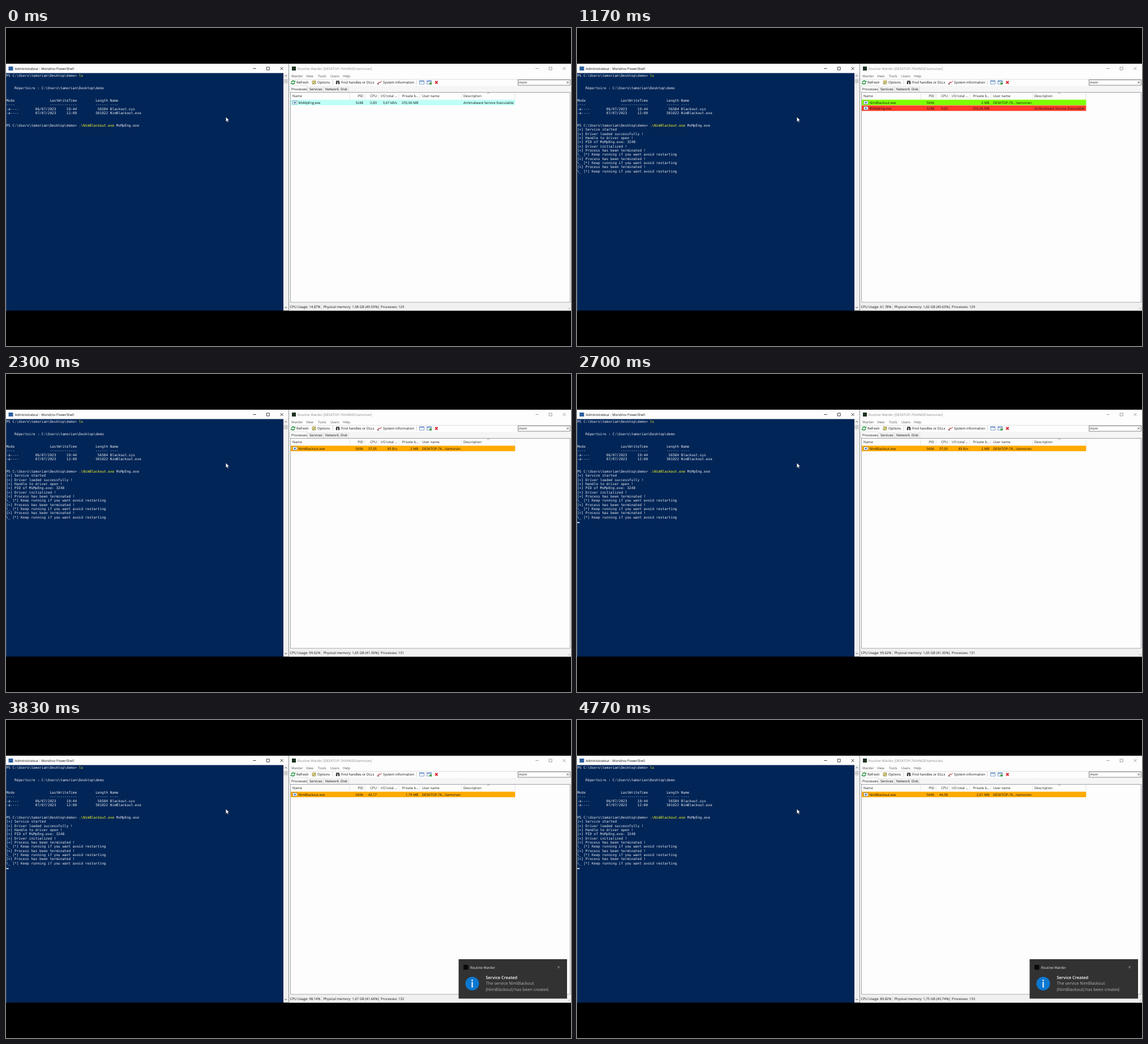
An HTML page for the animation above (4.81 s loop, 998x561 px).

```html
<!DOCTYPE html>
<html lang="fr">
<head>
<meta charset="utf-8">
<title>Process demo</title>
<style>
  html, body { margin: 0; width: 100%; height: 100%; overflow: hidden; background: #000; }
  svg { display: block; width: 998px; height: 561px; }
  text { font: 6px "Open Sans", "Noto Sans", sans-serif; white-space: pre; text-rendering: geometricPrecision; }
  .mono { font: 6.1px "DejaVu Sans Mono", monospace; fill: #eeedf0; }
  .cmd { fill: #ffff20; }
  .end { text-anchor: end; }
  .big { font-size: 7.45px; }
  .bold { font-weight: 600; }
</style>
</head>
<body>
<svg viewBox="0 0 998 561">
  <g id="frame"></g>
  <g id="list"></g>
  <g id="console"></g>
  <g id="toast"></g>
</svg>
<script>
const LOOP = 4810, ROW = 7.35, COL = 3.672, TOP = 63, BOTTOM = 498.5;
const USER = 'tamorian', APP = 'Routine Warder', WHITE = '#fdfdfd';
const PROMPT = `PS C:\\Users\\${USER}\\Desktop\\demo> `;
const layer = id => document.getElementById(id);

// y is the middle of the capitals
const text = (x, y, s, fill = '#111', cls = '') =>
  `<text x="${x}" y="${y + 2.1}" fill="${fill}" class="${cls}">${s}</text>`;
const rect = (x, y, w, h, fill, extra = '') =>
  `<rect x="${x}" y="${y}" width="${w}" height="${h}" fill="${fill}" ${extra}/>`;
const path = (d, stroke, width = 0.8, fill = 'none') =>
  `<path d="${d}" stroke="${stroke}" stroke-width="${width}" fill="${fill}"/>`;
const cross = (x, y, r, color, width) =>
  path(`M${x - r} ${y - r}l${2 * r} ${2 * r}m0 ${-2 * r}l${-2 * r} ${2 * r}`, color, width);
const mono = (row, s, col = 0, cls = '') =>
  text(0.4 + col * COL, 83.6 + row * ROW, s, '#eee', 'mono ' + cls);
const labels = (y, fill, items) => items.map(([x, s]) => text(x, y, s, fill)).join('');
const controls = (x, color) =>
  path(`M${x - 2.7} 71.5h5.4M${x + 21.2} 69h5v5h-5z`, color) + cross(x + 48, 71.5, 2.5, color);

function consoleWindow() {
  const listing = [
    [3, '    Répertoire : C:\\Users\\' + USER + '\\Desktop\\demo'],
    [6, 'Mode                 LastWriteTime         Length Name'],
    [7, '----                 -------------         ------ ----'],
    [8, '-a----        06/07/2023     19:44          56584 Blackout.sys'],
    [9, '-a----        07/07/2023     12:00         501022 NimBlackout.exe'],
    [12, PROMPT + '                  MsMpEng.exe'],
    [0, PROMPT]
  ];
  return rect(0, TOP, 499, 17, WHITE) + rect(0, 79.5, 490, BOTTOM - 79.5, '#022557') +
    rect(0, 79.5, 0.7, BOTTOM - 79.5, '#2f5f80') +
    rect(4.5, 68, 8, 7, '#2c5f9e') +
    text(15.5, 71.7, 'Administrateur : Mondrov PowerShell') + controls(439, '#111') +
    rect(490, 79.5, 9, BOTTOM - 79.5, '#f0f0f0') + rect(490.7, 90, 7, 7.5, '#cdcdcd') +
    path('M492.3 85.3l2-2 2 2M492.3 492l2 2 2-2', '#444', 0.9) +
    listing.map(([row, s]) => mono(row, s)).join('') +
    mono(0, 'ls', 35, 'cmd') + mono(12, '.\\NimBlackout.exe', 35, 'cmd') +
    path('M388.4 157v8.2l1.9-1.7 1.3 2.9 1.2-.6-1.3-2.8h2.5z', '#111', 0.3, '#fff');
}

function toolbar() {
  const pane = x => rect(x, 93, 8, 6, '#fff', 'stroke="#5b86c4" stroke-width=".8"') +
    rect(x, 93, 8, 1.5, '#5b86c4');
  return path('M504 95.5q3-4.5 6-.5M510 96.5q-3 4.5-6 .5', '#2f9a48', 1.8) +
    path('M508.3 95.2h3v-2.6zM505.6 96.8h-3v2.6z', 'none', 0, '#2f9a48') +
    rect(541, 93, 6, 6, '#e5d67a', 'stroke="#8c8240" stroke-width=".7" rx="1"') +
    path('M541.5 99l5-5', '#777', 1) +
    path('M584 99v-3l1-3M588 99v-3l-1-3', '#333', 2.4) +
    path('M655.5 98h2l1.5-3 1.5 2 3-3.5', '#b3202b', 1) + path('M656 99h3', '#222') +
    pane(730.5) + pane(743.5) + rect(748, 96, 4, 3.5, '#43a047') +
    cross(760.3, 96, 2.3, '#d8232f', 1.8) +
    path('M577 92v8M725 92v8', '#c8c8c8') +
    labels(96, '#111', [[513, 'Refresh'], [550, 'Options'], [592, 'Find handles or DLLs'],
      [666, 'System information']]);
}

function processWindow() {
  return rect(499, TOP, 499, BOTTOM - TOP, WHITE) + rect(499, TOP, 1, BOTTOM - TOP, '#8a9490') +
    rect(505, 68, 7, 7, '#1d3322') +
    text(515, 71.7, `${APP} [DESKTOP-7KX4M2E\\${USER}]`, '#8a8a8a') + controls(938, '#888') +
    labels(85, '#555', [[504, 'Warder'], [530, 'View'], [551, 'Tools'], [573, 'Users'], [595, 'Help']]) +
    path('M500 90.5h498', '#d8d8d8') + toolbar() +
    rect(904.5, 91.5, 92, 9.5, '#fff', 'stroke="#666" stroke-width=".8"') +
    text(906, 96.3, 'msm') + cross(992.3, 96, 1.8, '#333') +
    rect(500, 102, 498, 11.5, '#f5f5f5') + rect(532, 103, 73, 10, '#f0f0f0') +
    rect(502, 102, 30, 12, WHITE, 'stroke="#d5d5d5" stroke-width=".7"') +
    path('M561 103v10M588 103v10M605 103v10', '#d5d5d5') +
    labels(107.5, '#111', [[504, 'Processes'], [536, 'Services'], [564, 'Network'], [591, 'Disk']]) +
    rect(502.5, 113.5, 494, 370.5, WHITE, 'stroke="#858a90" stroke-width=".8"') +
    path([607, 634, 658, 694, 731, 805, 899].map(x => `M${x} 114.5v11`).join(''), '#dedede') +
    path('M850 116l2.3-2 2.3 2', '#777', 0.7) +
    labels(120, '#222', [[506, 'Name'], [662, 'I/O total ...'], [699.5, 'Private b...'],
      [735, 'User name'], [808, 'Description']]) +
    text(631, 120, 'PID', '#222', 'end') + text(655, 120, 'CPU', '#222', 'end') +
    rect(500, 485.5, 498, BOTTOM - 485.5, '#f0f0f0') +
    path('M557.5 487v10M659 487v10', '#d0d0d0') +
    path('M993 496.5l3.5-3.5M995 496.5l1.5-1.5', '#aaa');
}

function toastWindow() {
  return rect(799.5, 422, 191.5, 69.5, '#323232') +
    rect(808, 432, 8.5, 8.5, '#070b07') + text(820, 436.5, APP, '#f0f0f0') +
    cross(976, 436, 2, '#aaa', 0.7) +
    '<circle cx="823.5" cy="465" r="12" fill="#0b78d0"/>' +
    '<circle cx="823.5" cy="459.2" r="1.3" fill="#fff"/>' + rect(822.5, 462, 2, 10, '#fff') +
    text(847.5, 454.8, 'Service Created', '#fff', 'big bold') +
    text(847.5, 465.3, 'The service NimBlackout', '#b4b4b4', 'big') +
    text(847.5, 475.8, '(NimBlackout) has been created.', '#b4b4b4', 'big');
}

const engine = (color, cpu, io = '') =>
  [color, 'MsMpEng.exe', 3248, cpu, io, '255,06 MB', '', 'Antimalware Service Executable'];
const killer = (color, cpu, io, memory) =>
  [color, 'NimBlackout.exe', 5696, cpu, io, memory, `DESKTOP-7K...\\${USER}`, ''];
const CYAN = '#befff7', GREEN = '#7fff00', RED = '#ff3c28', ORANGE = '#ffaa00';

// cpu usage, physical memory, process count, rows
const snapshots = [
  ['14.87', '1,98 GB (49.59%)', 129, [engine(CYAN, '0,83', '3,47 kB/s')]],
  ['22.63', '1,99 GB (49.70%)', 129, [engine(CYAN, '0,02')]],
  ['61.78', '1,62 GB (40.63%)', 129, [killer(GREEN, '', '', '2 MB'), engine(RED, '0,02')]],
  ['99.62', '1,65 GB (41.30%)', 131, [killer(ORANGE, '37,05', '83 B/s', '2 MB')]],
  ['98.14', '1,67 GB (41.66%)', 132, [killer(ORANGE, '43,17', '', '1,79 MB')]],
  ['89.82', '1,75 GB (43.74%)', 133, [killer(ORANGE, '44,58', '', '2,01 MB')]]
];

function processRow([color, name, pid, cpu, io, memory, user, description], i) {
  const y = 131.4 + i * 10.1;
  const numbers = [[631, pid], [655, cpu], [691, io], [728.5, memory]];
  return rect(503, y - 4.9, 396.3, 9.7, color) +
    rect(506.5, y - 2.8, 7.5, 5.6, '#fff', 'stroke="#667" stroke-width=".6"') +
    rect(508.7, y - 1.2, 3, 2.6, '#2470b8') +
    labels(y, '#111', [[516.5, name], [735, user], [808, description]]) +
    numbers.map(([x, s]) => text(x, y, s, '#111', 'end')).join('');
}

const listView = ([cpu, memory, count, rows]) => rows.map(processRow).join('') +
  labels(492, '#111', [[501.5, `CPU Usage: ${cpu}%`], [560.5, `Physical memory: ${memory}`],
    [662, `Processes: ${count}`]]);

const killed = time => [[time, '[+] Process has been terminated !'],
  [time, '\\_ [*] Keep running if you want avoid restarting']];
const output = [
  [200, '[+] Service started'],
  [260, '[+] Driver loaded successfully !'],
  [260, '[+] Handle to driver open !'],
  [260, '[+] PID of MsMpEng.exe: 3248'],
  [260, '[+] Driver initialized !'],
  ...killed(300), ...killed(500), ...killed(1000)
];

function outputView(count, cursor) {
  return output.slice(0, count).map(([, s], i) => mono(13 + i, s)).join('') +
    (cursor ? rect(0.5, 84.8 + (13 + count) * ROW, 4, 1.8, '#eeedf0') : '');
}

const shown = {};
function update(id, key, draw) {
  if (shown[id] === key) return;
  shown[id] = key;
  layer(id).innerHTML = draw();
}

function render(now) {
  const t = now % LOOP;
  const refresh = Math.floor((t + 850) / 1000);
  const count = output.filter(([time]) => t >= time).length;
  const cursor = t >= 600 && (t - 600) % 1040 < 520;
  update('list', refresh, () => listView(snapshots[refresh]));
  update('console', count + '/' + cursor, () => outputView(count, cursor));

  const slide = Math.min(1, Math.max(0, (t - 2800) / 250));
  layer('toast').setAttribute('transform', `translate(${200 * (1 - slide) ** 3} 0)`);
  layer('toast').setAttribute('visibility', slide ? 'visible' : 'hidden');
  requestAnimationFrame(loop);
}

layer('frame').innerHTML = consoleWindow() + processWindow();
layer('toast').innerHTML = toastWindow();
const start = performance.now();
const loop = () => render(performance.now() - start);
loop();
</script>
</body>
</html>
```
